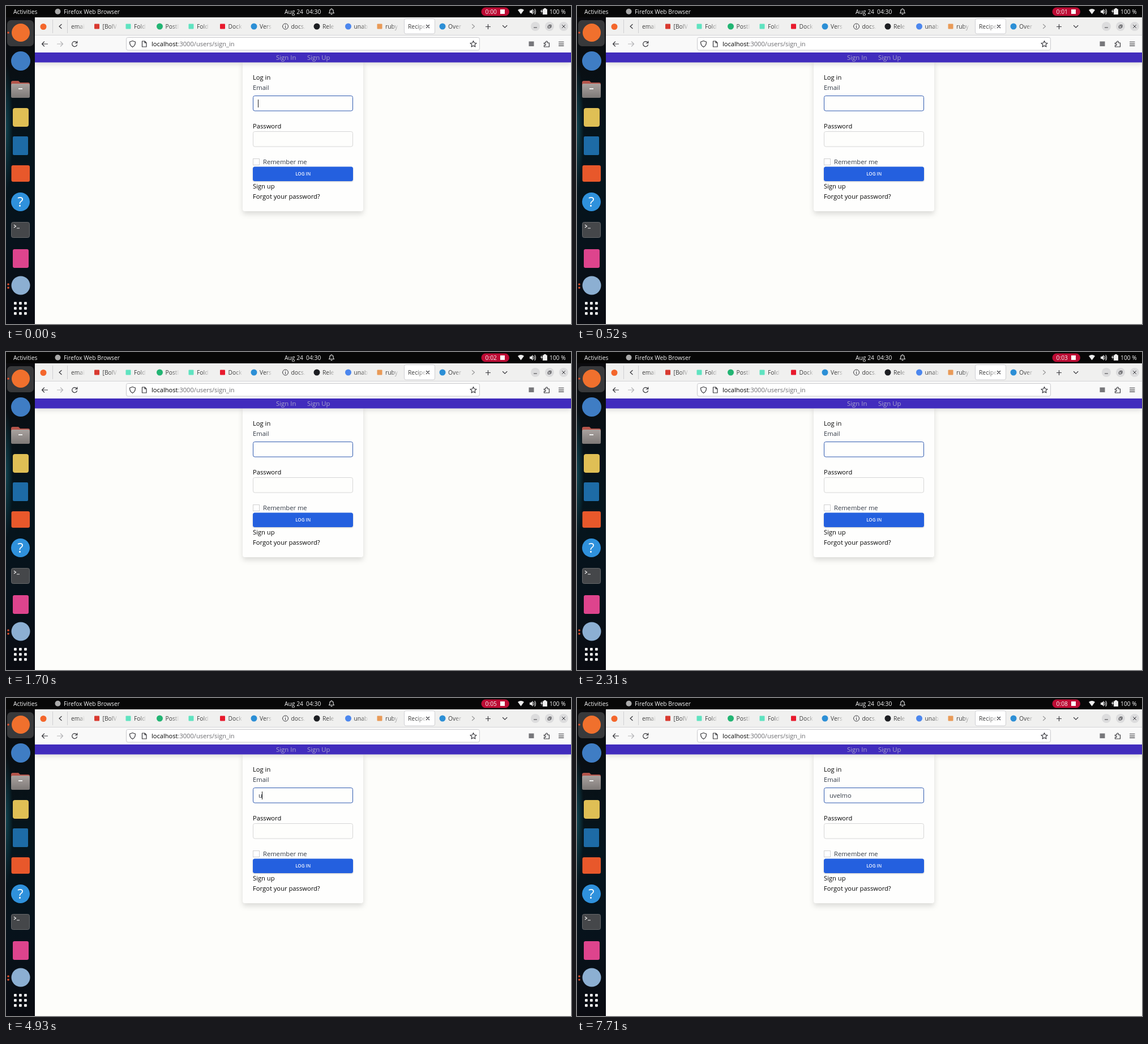
These frames come from a looping animation (998 px wide and 561 px high, 8000 ms). An HTML page:

```html
<!DOCTYPE html>
<html lang="en">
<head>
<meta charset="utf-8">
<title>Sign in</title>
<style>
  html, body { margin: 0; width: 100%; height: 100%; overflow: hidden; background: #fdfdfa; }
  svg { display: block; width: 998px; height: 561px; }
  text { font: 500 11.2px "Open Sans", "Noto Sans", sans-serif; white-space: pre; fill: #050505; }
  text.soft { fill: #343b47; }
  .nav text { fill: #aaa6cb; font-weight: 400; font-size: 11.35px; }
  .ui text { font-size: 10.3px; font-weight: 400; }
  .bar text { fill: #f4f4f4; }
  .line { fill: none; stroke: #38383d; stroke-width: 1.2; stroke-linecap: round; stroke-linejoin: round; }
  .bar .line { stroke: #ddd; }
  .thin { stroke-width: 1; }
  .card { filter: drop-shadow(0 5px 5px #0002); }
  .nav rect { filter: drop-shadow(0 3px 4px #0002); }
  .button { filter: drop-shadow(0 1px 1px #0003); }
</style>
</head>
<body>
<svg viewBox="0 0 998 561">
  <defs>
    <linearGradient id="fade">
      <stop offset=".5" stop-color="#3c3c3c"/>
      <stop offset="1" stop-color="#3c3c3c" stop-opacity=".1"/>
    </linearGradient>
    <linearGradient id="dockFill" x2="0" y2="1">
      <stop stop-color="#0b0b0e"/>
      <stop offset=".45" stop-color="#05151d"/>
      <stop offset=".75" stop-color="#07121b"/>
      <stop offset="1" stop-color="#0a0b11"/>
    </linearGradient>
    <radialGradient id="glow" cx="0">
      <stop stop-color="#0f4350"/>
      <stop offset="1" stop-color="#0f4350" stop-opacity="0"/>
    </radialGradient>
    <linearGradient id="folder" x2="0" y2="1">
      <stop stop-color="#a9a29f"/><stop offset="1" stop-color="#7e7977"/>
    </linearGradient>
  </defs>

  <!-- page -->
  <rect width="998" height="561" fill="#fdfdfa"/>
  <rect class="card" x="418" y="96" width="213" height="266" rx="4" fill="#fefefd"/>
  <g class="nav">
    <rect x="51" y="82" width="947" height="17.5" fill="#412cbd"/>
    <text x="477" y="95">Sign In</text>
    <text x="532" y="95">Sign Up</text>
  </g>
  <text x="436" y="130">Log in</text>
  <text class="soft" x="436" y="147.5">Email</text>
  <rect x="436.5" y="158.5" width="176" height="26.5" rx="3" fill="#fefefd" stroke="#2f5ab0"/>
  <text class="soft" id="email" x="446" y="176"></text>
  <rect id="caret" y="165" width="1" height="14" fill="#222"/>
  <text x="436" y="216">Password</text>
  <rect x="436.5" y="221.5" width="176" height="26.5" rx="3" fill="#fefefc" stroke="#d6d6d6"/>
  <rect x="436.5" y="269.5" width="11" height="11" fill="#fff" stroke="#d0d0d0"/>
  <text class="soft" x="454" y="279">Remember me</text>
  <rect class="button" x="436" y="283.5" width="177" height="25.5" rx="3.5" fill="#2460df"/>
  <text x="524.7" y="299.4" text-anchor="middle" style="font-size:8px;font-weight:600;fill:#f4f6ff">LOG IN</text>
  <text x="436" y="322">Sign up</text>
  <text x="436" y="339.5">Forgot your password?</text>

  <!-- browser -->
  <g class="ui">
    <rect x="51" y="20" width="947" height="31.5" fill="#f0f0ef"/>
    <rect x="51" y="51.5" width="947" height="30.5" fill="#f9f9f9"/>
    <path d="M51 51.5H998" stroke="#d5d5d8"/>
    <path d="M82.5 24V48M108.5 24V48" stroke="#d0d0d3"/>
    <circle cx="66" cy="36.5" r="5.5" fill="#f4662b"/>
    <rect x="703.5" y="22.5" width="54" height="26.5" rx="3" fill="#fff" stroke="#cfcfd3"/>
    <g id="tabs"></g>
    <path class="line" d="M98 32.5l-4 3.5 4 3.5M742.5 33.5l5 5m0-5l-5 5M847.5 36.5h8m-4-4v8M877.5 34.5l3.7 3.7 3.7-3.7"/>
    <path class="line" style="stroke:#999" d="M823.5 32.5l4 3.5-4 3.5"/>
    <g fill="#dcdcdd"><circle cx="935" cy="36" r="8"/><circle cx="960" cy="36" r="8"/><circle cx="985" cy="36" r="8"/></g>
    <path class="line thin" d="M932.5 38h5M957.7 35.2h3.6v3.6h-3.6zM959 33.5h4v4M982.5 33.5l5 5m0-5l-5 5"/>

    <rect x="212.5" y="55.5" width="624" height="22.5" rx="3" fill="#fff" stroke="#c9c9cd"/>
    <path class="line" d="M73.5 67h-10m4-4l-4 4 4 4M125.3 65.3a4.5 4.5 0 1 0 .2 3M125.8 62v3.5h-3.5"/>
    <path class="line" style="stroke:#b5b5b8" d="M90.5 67h10m-4-4l4 4-4 4"/>
    <path class="line" d="M223.5 61.5l5 1.8c0 5-1.5 7.5-5 9.2-3.5-1.7-5-4.2-5-9.2zM240.5 62h4.5l3 3v7h-7.5zM245 62v3h3"/>
    <path class="line" d="M825.5 61.5l1.6 3.5 3.9.5-2.9 2.6.8 3.9-3.4-2-3.4 2 .8-3.9-2.9-2.6 3.9-.5z"/>
    <rect x="923.5" y="62.5" width="9" height="8.5" fill="#77777b"/>
    <path class="line" d="M950.5 65h3v-1.5a1.5 1.5 0 0 1 3 0v1.5h3v7h-9v-2.5h1.5a1.2 1.2 0 0 0 0-2.5h-1.5zM976.5 63.5h8.5m-8.5 3.3h8.5m-8.5 3.3h8.5"/>
    <text x="257" y="70.5" style="font-size:11.1px">localhost<tspan fill="#6c6c70">:3000/users/sign_in</tspan></text>
  </g>

  <!-- dock -->
  <rect y="20" width="51" height="541" fill="url(#dockFill)"/>
  <rect y="100" width="24" height="230" fill="url(#glow)"/>
  <rect x="2" y="25" width="47" height="46" rx="7" fill="#38393b"/>
  <g id="dock"></g>
  <path d="M9 135q0-3 3-3h10l3 3h14q3 0 3 3v6H9z" fill="#b4544a"/>
  <rect x="9" y="137" width="33" height="25" rx="2.5" fill="url(#folder)"/>
  <path d="M22 146h7" stroke="#eee" stroke-width="2"/>
  <circle cx="25.5" cy="345.5" r="16.5" fill="#2f91dc"/>
  <text x="25.5" y="354" text-anchor="middle" style="font-size:24px;fill:#fff">?</text>
  <rect x="9.5" y="381.5" width="32" height="27" rx="3" fill="#45474a" stroke="#66686a"/>
  <path d="M14 386l3.5 2.5-3.5 2.5M19 392h5" fill="none" stroke="#eee" stroke-width="1.2"/>
  <g fill="#e2502b"><circle cx="4" cy="47" r="1.8"/><circle cx="4" cy="491" r="1.8"/><circle cx="4" cy="497" r="1.8"/></g>

  <!-- top bar -->
  <g class="ui bar">
    <rect width="998" height="20" fill="#070707"/>
    <text x="13" y="13.5">Activities</text>
    <circle cx="91.5" cy="9.8" r="5" fill="#aaa"/>
    <text x="102" y="13.5">Firefox Web Browser</text>
    <text x="492" y="13.5">Aug 24</text>
    <text x="530" y="13.5">04:30</text>
    <path class="line" d="M570.5 12.5q1.5-1 1.5-4t3-3 3 3 1.5 4zM574 14.7h2M575 4.5v1"/>
    <rect x="839.5" y="2.5" width="49.5" height="15" rx="7.5" fill="#bd0b34"/>
    <text id="clock" x="846.5" y="13.5"></text>
    <rect x="873" y="6" width="8" height="8" fill="#fff"/>
    <path d="M904 7q5.5-4 11 0l-5.5 7.5zM925 8h2.5l3-3v10l-3-3H925z" fill="#eee"/>
    <path class="line" d="M932 7.5q1.8 2.5 0 5M934 5.5q3 4.5 0 9"/>
    <path d="M948 5.5h2V4h4v1.5h2v9.5h-8zM946.5 5l-2.5 5h2l-1 4 3-5.5h-2z" fill="#eee"/>
    <text x="960" y="13.5">100 %</text>
  </g>
</svg>
<script>
const $ = id => document.getElementById(id);
const square = (x, y, w, h, fill, rx = 1) =>
  `<rect x="${x}" y="${y}" width="${w}" height="${h}" rx="${rx}" fill="${fill}"/>`;
const circle = (x, y, r, fill) => `<circle cx="${x}" cy="${y}" r="${r}" fill="${fill}"/>`;

// title, icon shape, icon colour
const tabs = [
  ['emai'], ['[BolV', 'square', '#d93a30'], ['Fold', 'square', '#5fe3c0'],
  ['Postl', 'circle', '#22b573'], ['Fold', 'square', '#5fe3c0'], ['Dock', 'square', '#e8192c'],
  ['Vers', 'circle', '#2c8fd6'], ['docs.', 'info'], ['Rele', 'circle', '#1c1e22'],
  ['unab', 'circle', '#4c87ee'], ['ruby', 'square', '#e99a57'], null, ['Over', 'circle', '#2c8fd6']
];
const icons = {
  square: (x, fill) => square(x - 4.5, 31.5, 9, 9, fill),
  circle: (x, fill) => circle(x, 36, 5.5, fill),
  info: x => `<path class="line thin" d="M${x - 5} 36a5 5 0 1 0 10 0a5 5 0 1 0-10 0M${x} 35.5v3M${x} 33.3v.2"/>`
};
const title = (x, label) => `<text x="${x}" y="40" style="fill:url(#fade)">${label}</text>`;
$('tabs').innerHTML = title(710, 'Recipe') + tabs.map((tab, i) => {
  if (!tab) return '';
  const [label, icon, fill] = tab, x = 115 + 55.5 * i;
  return (icon ? icons[icon](x - 10, fill) : '') + title(x, label);
}).join('');

let dock = circle(26, 47, 16, '#f0702d') + circle(26, 97, 17, '#3f7dc4')
  + square(12, 180, 28, 33, '#dfbf55', 4) + square(12, 230, 27, 33, '#1d6ba6', 2)
  + square(9.5, 281, 32.5, 29, '#e8582b', 3) + square(12, 429, 28, 33, '#de448d', 3)
  + circle(26, 493, 16.5, '#8cafd2');
for (let i = 0; i < 9; i++)
  dock += square(14 + i % 3 * 9, 522 + Math.floor(i / 3) * 9, 4.8, 4.8, '#f2f2f2');
$('dock').innerHTML = dock;

const NAME = 'uvelmo';
// time, letters typed, caret shown
const steps = [
  [0, 0, 1], [520, 0, 0], [1150, 0, 1], [1700, 0, 0], [2910, 0, 1], [4100, 0, 0],
  [4930, 1, 1], [5310, 0, 1], [5500, 2, 1], [6400, 2, 0], [6550, 3, 1], [6660, 4, 1],
  [6880, 5, 1], [7400, 6, 1], [7710, 6, 0]
];
const email = $('email'), caret = $('caret'), clock = $('clock');

function draw() {
  const t = performance.now() % 8000;
  const [, typed, shown] = steps.findLast(step => step[0] <= t);
  email.textContent = NAME.slice(0, typed);
  caret.setAttribute('x', Math.round(445.4 + (typed && email.getComputedTextLength())));
  caret.setAttribute('opacity', shown);
  clock.textContent = '0:0' + Math.floor((t + 695) / 1000);
  requestAnimationFrame(draw);
}
draw();
</script>
</body>
</html>
```
